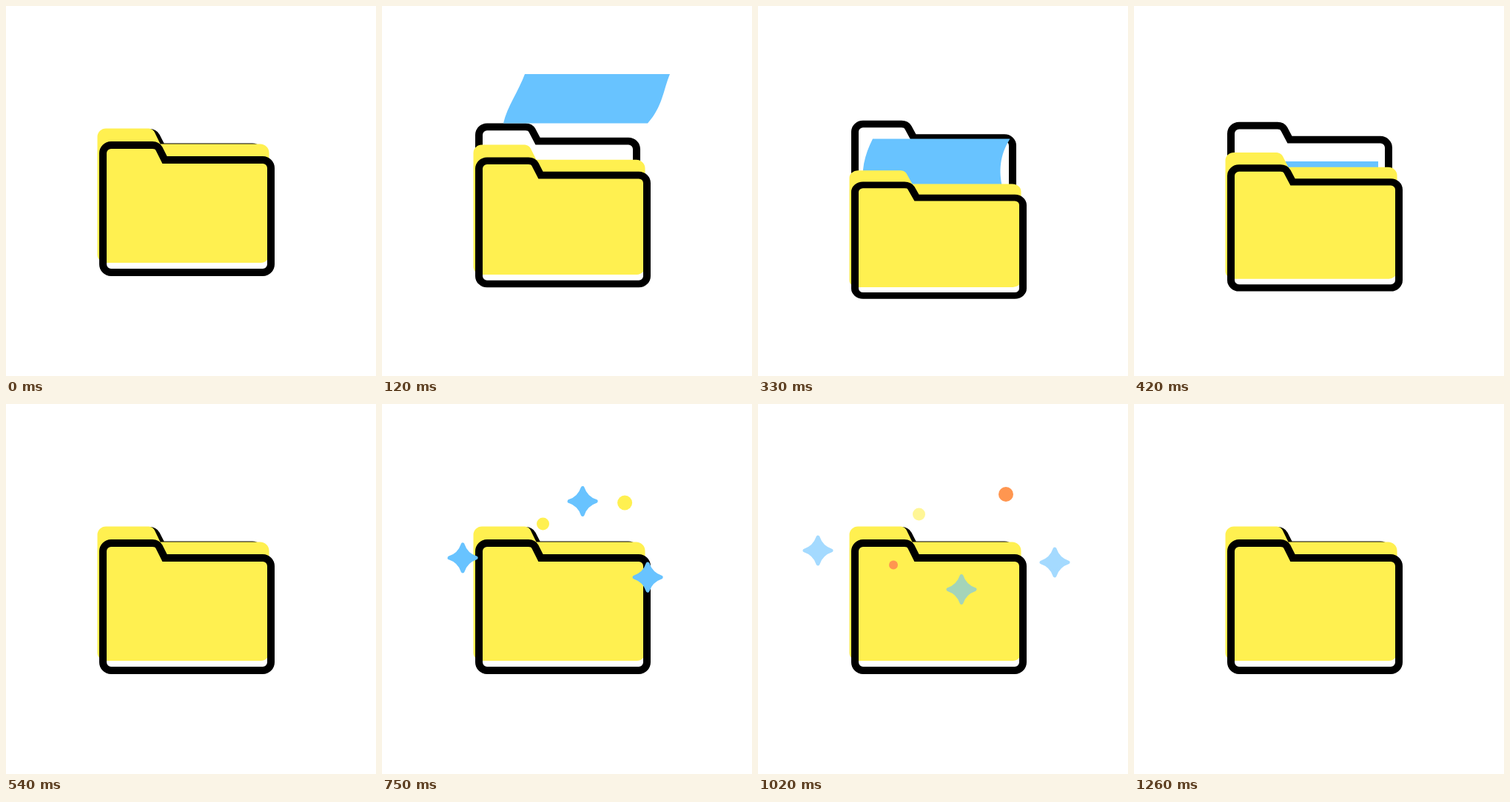
An HTML page that plays this animation: 500x500 px, repeating every 1.35 s.

```html
<!DOCTYPE html>
<html lang="en">
<head>
<meta charset="utf-8">
<title>Folder</title>
<style>
  html, body { margin: 0; width: 100%; height: 100%; overflow: hidden; background: #fff; }
  svg { display: block; width: 100%; height: 100%; }
  .line { fill: none; stroke: #000; stroke-width: 10; }
  .yellow { fill: #fff050; }
  .blue { fill: #68c3ff; }
  .star { stroke: #68c3ff; stroke-width: 5; stroke-linejoin: round; }
</style>
</head>
<body>
<svg viewBox="0 0 500 500">
  <path id="back" class="line" d="M131 320V182a11 11 0 0 1 11-11H194c5 0 7 1.500 9 5L210.500 190.500H333a11 11 0 0 1 11 11V320"/>
  <path id="paper" class="blue"/>
  <g id="front">
    <path class="yellow" d="M123.500 177a11.500 11.500 0 0 1 11.500-11.500H191c5 0 8 1.500 10 5.500L208.500 186.500H343.500a12 12 0 0 1 12 12V336a11 11 0 0 1-11 11H134.500a11 11 0 0 1-11-11Z"/>
    <path class="line" d="M131 199a11 11 0 0 1 11-11H198c5 0 7 1.500 9 5L214.500 208H347a11 11 0 0 1 11 11V349a11 11 0 0 1-11 11H142a11 11 0 0 1-11-11Z"/>
  </g>
  <g id="sparks"></g>
</svg>
<script>
const LOOP = 1350, STEP = 30;
const $ = id => document.getElementById(id);
const clamp = v => Math.min(1, Math.max(0, v));
const span = (t, a, b) => clamp((t - a) / (b - a));
const mix = (a, b, u) => a + (b - a) * u;
const smooth = u => u * u * (3 - 2 * u);
const cosDeg = d => Math.cos(d * Math.PI / 180);

// time, top, then x of the left and right edge curves from top to bottom
const sheet = [
  [30, 56, 259, 245, 228, 212, 455, 442, 425, 408],
  [120, 92, 193, 185, 169, 164, 389, 380, 379, 359],
  [240, 149, 166, 144, 132, 145, 351, 323, 320, 331],
  [420, 210, 144, 144, 144, 144, 330, 330, 330, 330],
  [540, 214, 144, 144, 144, 144, 330, 330, 330, 330]
];
const SHEET_H = 66.5;

const sparks = [
  { from: [211, 244], to: [81, 198] },
  { from: [207, 307], to: [401, 214] },
  { from: [257, 327], to: [275, 250], toss: true },
  { from: [217.5, 209], to: [217.5, 149], r: 8.5 },
  { from: [303, 175], to: [335, 122], r: 10, turns: true },
  { from: [201, 247], to: [183, 217.5], r: 6, turns: true }
];

for (const s of sparks) {
  s.el = document.createElementNS('http://www.w3.org/2000/svg', s.r ? 'circle' : 'path');
  if (s.r) {
    s.el.setAttribute('r', s.r);
    s.el.setAttribute('class', 'yellow');
  } else {
    s.el.setAttribute('d', 'M0-18C3-9 9-3 18 0C9 3 3 9 0 18C-3 9-9 3-18 0C-9-3-3-9 0-18Z');
    s.el.setAttribute('class', 'blue star');
  }
  $('sparks').append(s.el);
}

function tilt(id, base, angle) {
  const k = cosDeg(angle.deg);
  $(id).setAttribute('transform', `matrix(1 0 0 ${k} 0 ${base * (1 - k) + angle.dy})`);
}

function drawFolder(t) {
  const open = smooth(span(t, 0, 240)) * (1 - smooth(span(t, 345, 540)));
  tilt('front', 365, { deg: 29.6 * open, dy: 30.7 * open });
  tilt('back', 347, { deg: 17 * open, dy: -19.2 * open });
}

function drawPaper(t) {
  const shown = t >= 30 && t < 540;
  $('paper').style.display = shown ? '' : 'none';
  if (!shown) return;
  const i = sheet.findIndex(k => k[0] > t);
  const a = sheet[i - 1], b = sheet[i];
  const [y, l0, l1, l2, l3, r0, r1, r2, r3] =
    a.map((v, n) => mix(v, b[n], span(t, a[0], b[0]))).slice(1);
  const y1 = y + SHEET_H / 3, y2 = y + SHEET_H * 2 / 3, y3 = y + SHEET_H;
  $('paper').setAttribute('d',
    `M${l0} ${y}C${l1} ${y1} ${l2} ${y2} ${l3} ${y3}H${r3}C${r2} ${y2} ${r1} ${y1} ${r0} ${y}Z`);
}

function drawSparks(t) {
  const fly = 1 - (1 - span(t, 570, 1020)) ** 3;
  const size = span(t, 570, 720) * (1 - span(t, 1110, 1260) ** 1.5);
  const fade = 1 - span(t, 860, 1260);
  const turn = span(t, 780, 930);
  for (const s of sparks) {
    const x = mix(s.from[0], s.to[0], fly);
    const y = s.toss
      ? Math.min(344, 103.5 + 0.00416 * (t - 832) ** 2)
      : mix(s.from[1], s.to[1], fly);
    s.el.setAttribute('transform', `translate(${x} ${y}) scale(${size})`);
    if (s.turns) s.el.style.fill = `rgb(255 ${mix(240, 150, turn)} 80)`;
    else s.el.style.opacity = fade;
    s.el.style.display = size > 0 ? '' : 'none';
  }
}

function draw(now) {
  const t = Math.floor(now % LOOP / STEP) * STEP;
  drawFolder(t);
  drawPaper(t);
  drawSparks(t);
}

let start;
function tick(now) {
  start ??= now;
  draw(now - start);
  requestAnimationFrame(tick);
}
draw(0);
requestAnimationFrame(tick);
</script>
</body>
</html>
```
